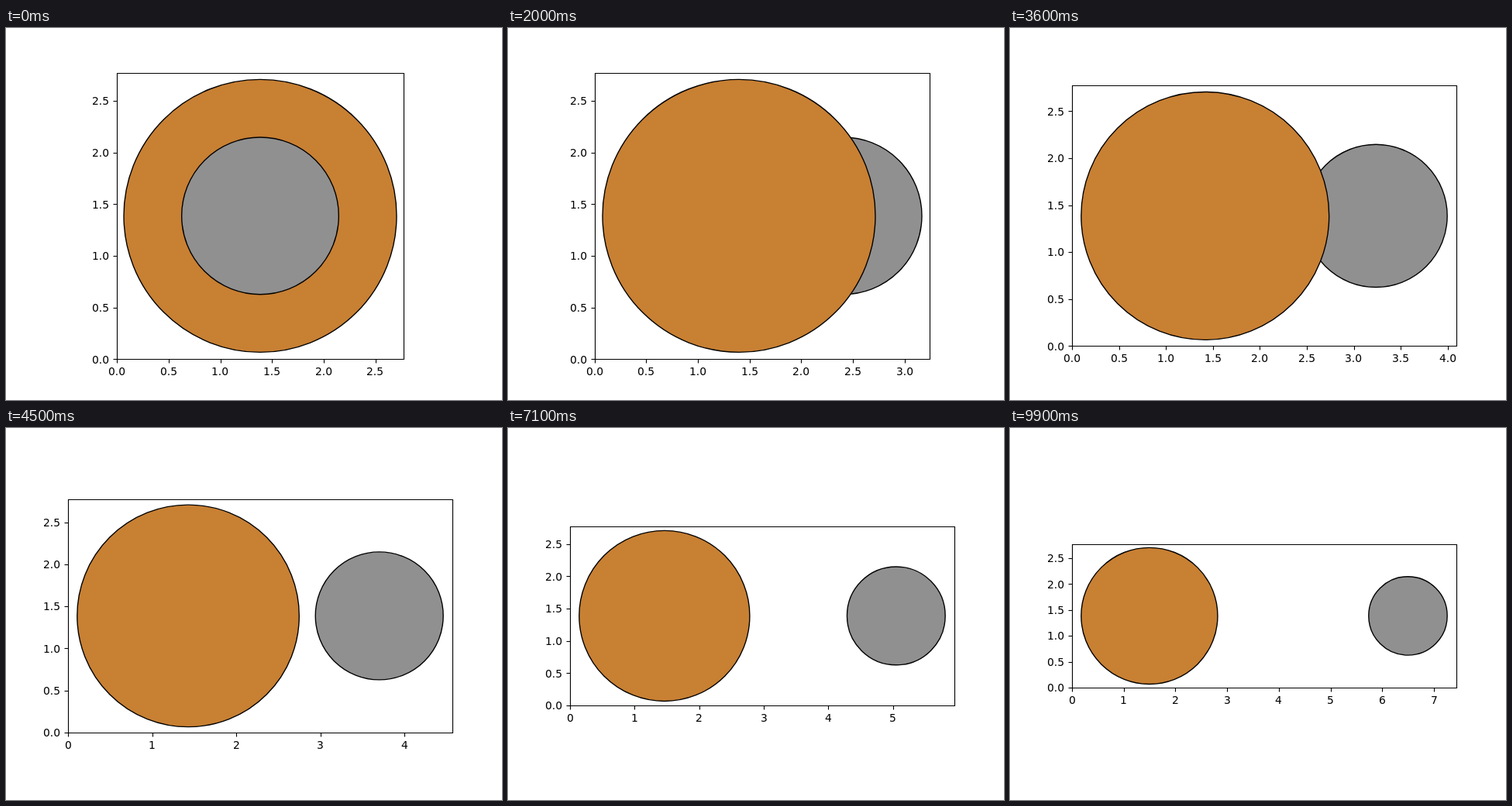
Animation of 640 by 480 pixels, one loop 10000 ms. Source, as an HTML page:

```html
<!DOCTYPE html>
<html lang="en">
<head>
<meta charset="utf-8">
<title>Two circles moving apart</title>
<style>
  html, body { margin: 0; width: 100%; height: 100%; overflow: hidden; background: #fff; }
  svg { display: block; }
  text { font: 13.889px "DejaVu Sans", sans-serif; }
  path { fill: none; stroke: #000; stroke-width: 1.111; }
  circle { stroke: #000; stroke-width: 1.389; }
</style>
</head>
<body>
<svg id="stage" width="640" height="480" viewBox="0 0 640 480"></svg>
<script>
const STEPS = 100, STEP_MS = 100, MAX_DISTANCE = 5;
const BIG = 1.32, SMALL = 0.76, PADDING = 1.05;
const AREA = { cx: 328, cy: 242.4, width: 496, height: 369.6 };
const FONT_SIZE = 13.889, LABEL_GAP = 9.72;

const stage = document.getElementById('stage');
const snap = v => Math.round(v) + 0.5;
const line = d => `<path d="${d}"/>`;
const circle = (x, y, r, fill) => `<circle cx="${x}" cy="${y}" r="${r}" fill="${fill}"/>`;
const label = (x, y, s) => `<text x="${Math.round(x)}" y="${Math.round(y)}">${s}</text>`;
const textWidth = s => FONT_SIZE * (s.length > 1 ? 1.59 : 0.636);

function ticks(range, step) {
  const count = Math.floor(range / step) + 1;
  return Array.from({ length: count }, (_, i) => i * step);
}

function draw(step) {
  const distance = MAX_DISTANCE * step / (STEPS - 1);
  const content = Math.max(2 * BIG, BIG + distance + SMALL);
  const xRange = content * PADDING, yRange = 2 * BIG * PADDING;
  const scale = Math.min(AREA.width / xRange, AREA.height / yRange);
  const left = AREA.cx - xRange * scale / 2, right = AREA.cx + xRange * scale / 2;
  const top = AREA.cy - yRange * scale / 2, bottom = AREA.cy + yRange * scale / 2;

  const bigX = left + (content * (PADDING - 1) / 2 + BIG) * scale;
  const big = circle(bigX, AREA.cy, BIG * scale, '#c88033');
  const small = circle(bigX + distance * scale, AREA.cy, SMALL * scale, '#909090');
  // The small circle is in front only while the two are concentric.
  let out = step === 0 ? big + small : small + big;

  const xStep = xRange > 4.5 ? 1 : 0.5;
  for (const value of ticks(xRange, xStep)) {
    const x = left + value * scale, s = value.toFixed(xStep < 1 ? 1 : 0);
    out += line(`M${snap(x)} ${snap(bottom)}v5`);
    out += label(x - textWidth(s) / 2, bottom + 20.7, s);
  }
  for (const value of ticks(yRange, 0.5)) {
    const y = bottom - value * scale, s = value.toFixed(1);
    out += line(`M${snap(left)} ${snap(y)}h-5`);
    out += label(left - LABEL_GAP - textWidth(s), y + 5.3, s);
  }
  out += line(`M${snap(left)} ${snap(top)}H${snap(right)}V${snap(bottom)}H${snap(left)}Z`);
  stage.innerHTML = out;
}

let shown = -1;
const start = performance.now();
function tick() {
  const step = Math.floor((performance.now() - start) / STEP_MS) % STEPS;
  if (step !== shown) draw(shown = step);
  requestAnimationFrame(tick);
}
tick();
</script>
</body>
</html>
```
